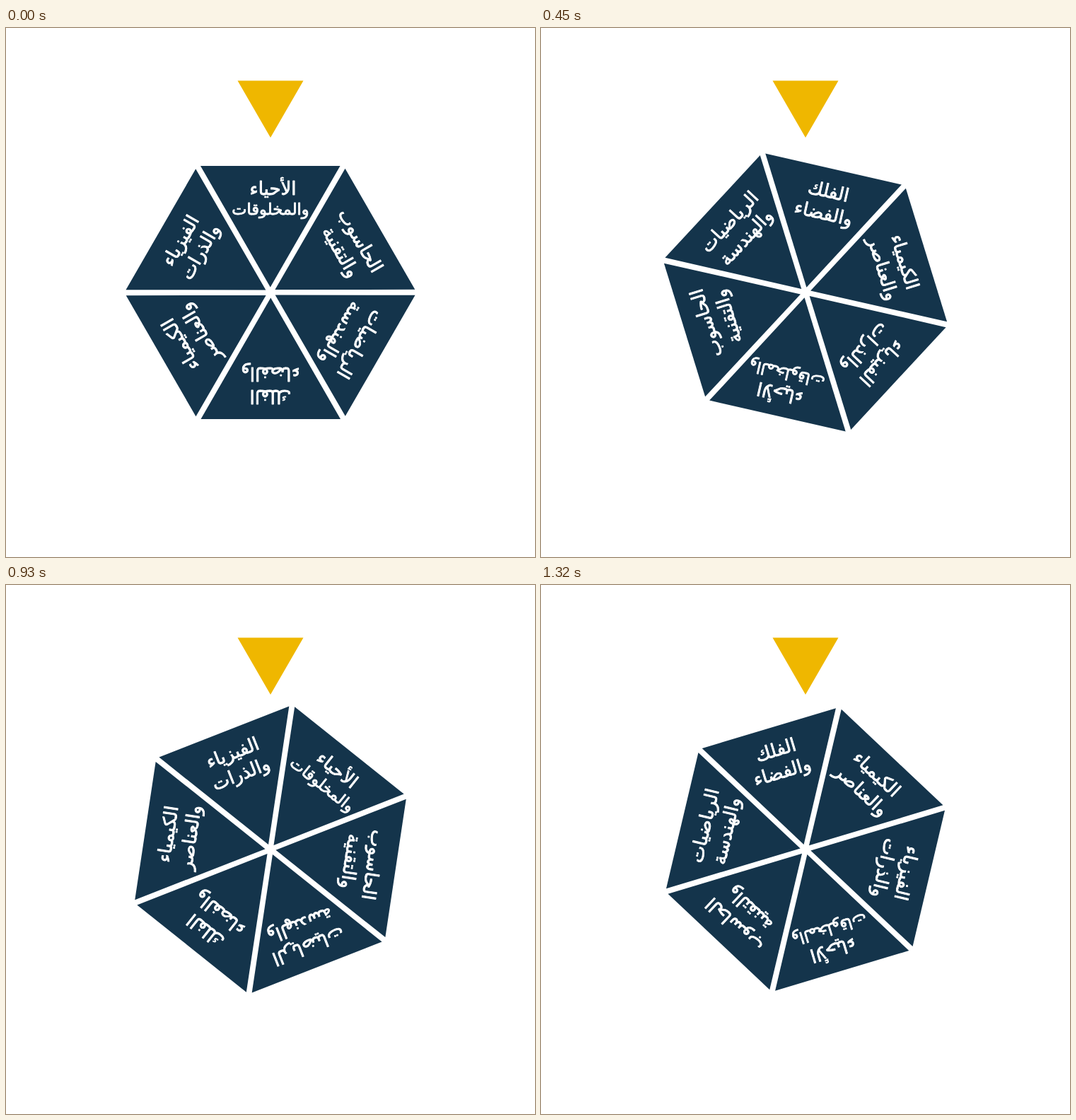
These frames come from a looping animation (748 px wide and 748 px high, 1.52 s). An HTML page:

```html
<!DOCTYPE html>
<html lang="ar">
<head>
<meta charset="utf-8">
<style>
  html, body { margin: 0; width: 100%; height: 100%; overflow: hidden; background: #fff; }
  svg { display: block; width: 748px; height: 748px; }
  text {
    fill: #fff; stroke: #fff; stroke-width: 0.9; stroke-linejoin: round;
    font-family: "DejaVu Sans", sans-serif; text-anchor: middle; direction: rtl;
  }
</style>
</head>
<body>
<svg viewBox="0 0 748 748">
  <path d="M327.5 74.5H420.5L374 155Z" fill="#efb700"/>
  <g id="wheel"></g>
</svg>
<script>
const CENTER = 374, LOOP = 1520, STEP = 30, LAST_STEP = 44;
const FAST = 360 / 28, SLOW = 8.145, SLOW_FROM = 35; // degrees per step

// Clockwise from the top: two lines, then optional overrides.
const sectors = [
  { lines: ['الأحياء', 'والمخلوقات'], shift: 3.5, size2: 22.5, base2: -110 },
  { lines: ['الحاسوب', 'والتقنية'] },
  { lines: ['الرياضيات', 'والهندسة'] },
  { lines: ['الفلك', 'والفضاء'] },
  { lines: ['الكيمياء', 'والعناصر'] },
  { lines: ['الفيزياء', 'والذرات'] },
];

const wheel = document.getElementById('wheel');
wheel.innerHTML = sectors.map(({ lines, shift = 0, size2 = 26, base2 = -106 }, i) => `
  <g transform="rotate(${i * 60})">
    <path d="M-99 -179H98.5L-0.25 -7.5Z" fill="#14344b"/>
    <text x="${shift}" y="-138" font-size="26">${lines[0]}</text>
    <text y="${base2}" font-size="${size2}">${lines[1]}</text>
  </g>`).join('');

function angleAt(step) {
  return FAST * Math.min(step, SLOW_FROM) + SLOW * Math.max(0, step - SLOW_FROM);
}

function draw(time) {
  const step = Math.min(LAST_STEP, Math.floor((time % LOOP) / STEP));
  wheel.setAttribute('transform', `translate(${CENTER} ${CENTER}) rotate(${angleAt(step)})`);
}

const start = performance.now();
function tick() {
  draw(performance.now() - start);
  requestAnimationFrame(tick);
}
tick();
</script>
</body>
</html>
```
